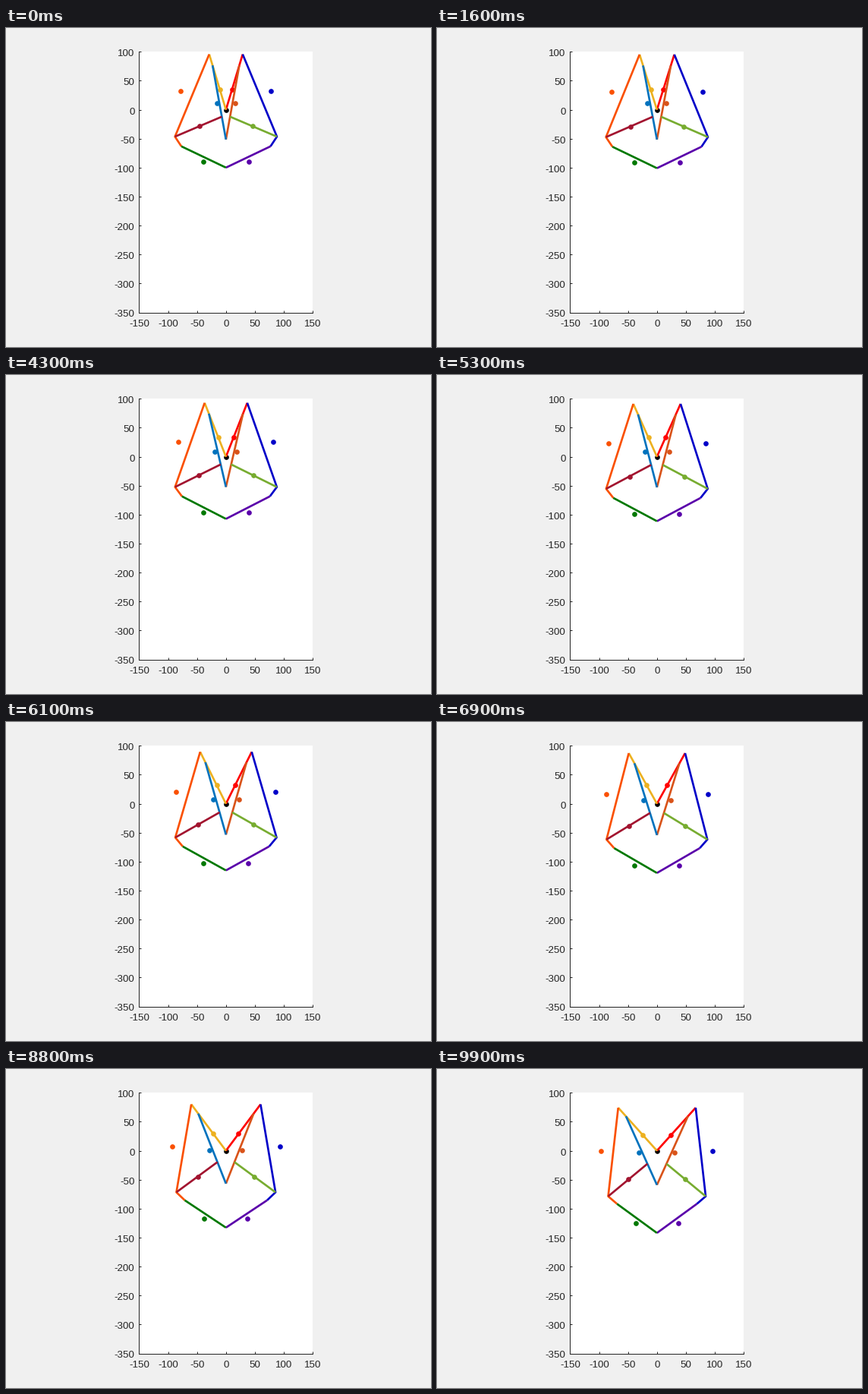
Animation of 560 by 420 pixels, one loop 10000 ms. Source, as a matplotlib script:

```python
import numpy as np
import matplotlib.pyplot as plt
from matplotlib.animation import FuncAnimation

W, H, DPI = 560, 420, 80
PT = 72 / DPI                 # points per pixel
AX_W, AX_H = 228.8, 343.2
SCALE = AX_H / 450            # pixels per data unit
FRAMES = 100

CRANK, CRANK_PIN = 100, 80
ROD, ROD_PIN = 130, 40
THIGH, ARM, HEEL, SHIN = 154, 88, 20, 85.4
HEEL_TURN = np.radians(-56)

# link name -> (right colour, left colour), in drawing order
COLORS = {
    "crank": ("#ff0000", "#edb120"),
    "rod": ("#d95319", "#0072bd"),
    "thigh": ("#0000c8", "#fa5000"),
    "arm": ("#77ac30", "#a2142f"),
    "shin": ("#5a00aa", "#007800"),
}


def unit(v):
    return v / np.hypot(*v)


def perp(v):
    return np.array([-v[1], v[0]])


def offset(start, end, along, side):
    """Point measured along the line start-end and to its left."""
    u = unit(end - start)
    return start + along * u + side * perp(u)


def pose(n):
    """Paths and mass centres of the right half of the linkage."""
    a = np.radians(16.8 + (0.00262 - 5e-7 * n) * n * n)
    u = np.array([np.sin(a), np.cos(a)])
    hub = np.zeros(2)
    tip, pin = CRANK * u, CRANK_PIN * u
    slider = np.array([0, pin[1] - np.sqrt(ROD**2 - pin[0]**2)])
    joint = offset(slider, pin, ROD_PIN, 0)

    d = np.hypot(*(tip - joint))
    x = (ARM**2 - THIGH**2 + d * d) / (2 * d)
    knee = offset(joint, tip, x, -np.sqrt(ARM**2 - x * x))

    t = np.arctan2(*(knee - tip)[::-1]) + HEEL_TURN
    heel = knee + HEEL * np.array([np.cos(t), np.sin(t)])
    foot = np.array([0, heel[1] - np.sqrt(SHIN**2 - heel[0]**2)])

    return {
        "crank": ([hub, tip], offset(hub, tip, 36.2, 0)),
        "rod": ([slider, pin], offset(slider, pin, 64.1, -4.7)),
        "thigh": ([tip, knee, heel], offset(tip, knee, 77.9, 20.6)),
        "arm": ([joint, knee], offset(joint, knee, 42.4, 0)),
        "shin": ([heel, foot], offset(heel, foot, SHIN / 2 + 2.7, 7.7)),
    }


fig = plt.figure(figsize=(W / DPI, H / DPI), dpi=DPI, facecolor="#f0f0f0")
ax = fig.add_axes([175.4 / W, 45.45 / H, AX_W / W, AX_H / H])
ax.set(xlim=(-150, 150), ylim=(-350, 100))
ink = "#262626"
ax.spines[["top", "right"]].set_visible(False)
for side in ("left", "bottom"):
    ax.spines[side].set(color=ink, linewidth=PT)
xticks, yticks = range(-150, 151, 50), range(-350, 101, 50)
ax.set_xticks(xticks)
ax.set_yticks(yticks)
ax.tick_params(direction="in", length=3.4 * PT, width=PT, color=ink,
               labelleft=False, labelbottom=False)

font = dict(family="Liberation Sans", size=13.33 * PT, color=ink, va="baseline")
for x in xticks:
    ax.text(x, -350 - 18.6 / SCALE, str(x), ha="center", **font)
for y in yticks:
    ax.text(-150 - 6 / SCALE, y - 5.9 / SCALE, str(y), ha="right", **font)

dot = dict(marker="o", ms=6.7 * PT, mew=0, ls="none", snap=False)
ax.plot(0, 0, color="black", **dot)
parts = []
for name, pair in COLORS.items():
    for sign, color in zip((1, -1), pair):
        line, = ax.plot([], [], color=color, lw=2.67 * PT,
                        solid_capstyle="butt", solid_joinstyle="round")
        mass, = ax.plot([], [], color=color, **dot)
        parts.append((name, np.array([sign, 1]), line, mass))


def update(n):
    links = pose(n)
    for name, flip, line, mass in parts:
        path, centre = links[name]
        line.set_data(*(np.array(path) * flip).T)
        mass.set_data(*(centre * flip).reshape(2, 1))
    return [artist for part in parts for artist in part[2:]]


anim = FuncAnimation(fig, update, frames=FRAMES, interval=100,
                     repeat=True, repeat_delay=0)
plt.show()
```
